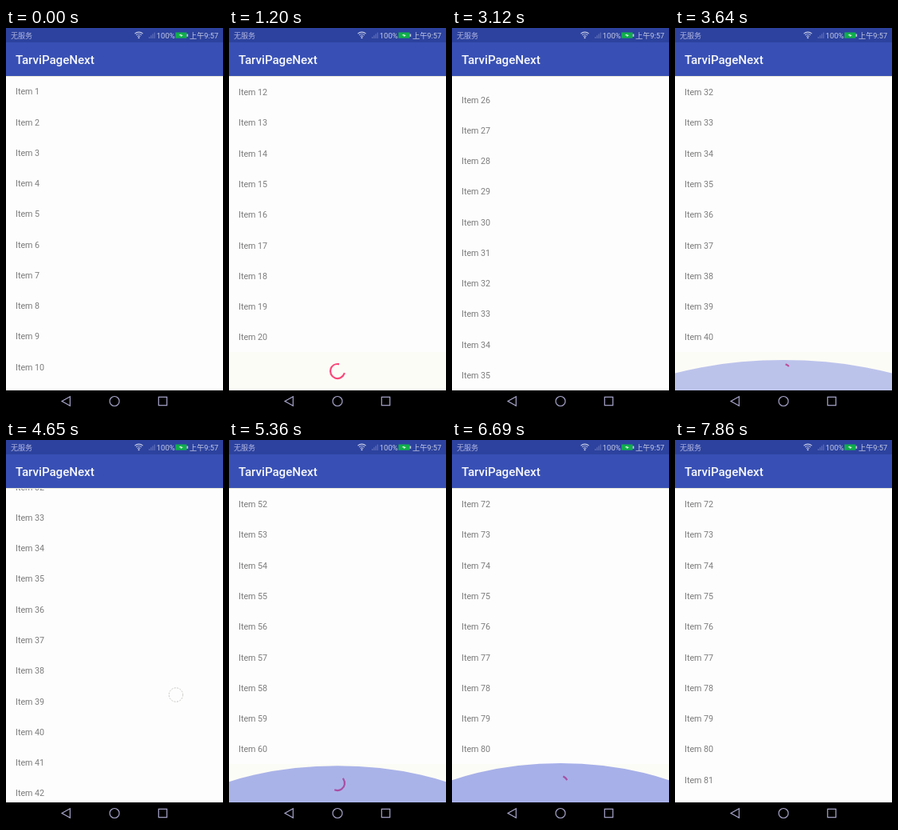
Animation of 272 by 480 pixels, one loop 8000 ms. Source, as an HTML page with a canvas:

```html
<!DOCTYPE html>
<html lang="zh">
<head>
<meta charset="utf-8">
<title>Endless list</title>
<style>
  html, body { margin: 0; width: 100%; height: 100%; overflow: hidden; background: #000; }
  canvas { display: block; width: 100vw; height: 100vh; }
</style>
</head>
<body>
<canvas id="stage"></canvas>
<script>
const W = 272, H = 480, LOOP = 8000;
const TOP = 60, BOTTOM = 453, ROW = 38.27, LOADER = 47.7, PAGE = 20;
const SANS = 'Roboto, "Noto Sans CJK SC", "Noto Sans CJK", sans-serif';

// Each swipe runs to the end of the list; its page has loaded at `done`.
const swipes = [
  { start: 30, hit: 740, done: 2340, glow: 0, alpha: 0 },
  { start: 2470, hit: 3560, done: 4620, glow: 38, alpha: 0.35 },
  { start: 4640, hit: 5140, done: 6180, glow: 46, alpha: 0.45 },
  { start: 6190, hit: 6588, done: 7850, glow: 49, alpha: 0.47 }
];

const canvas = document.getElementById('stage');
const ctx = canvas.getContext('2d');

const clamp = x => Math.max(0, Math.min(1, x));
const endOfList = count => count ? count * ROW + LOADER - (BOTTOM - TOP) : 0;

// cubic-bezier(.4, 0, .2, 1)
function ease(x) {
  if (x <= 0) return 0;
  if (x >= 1) return 1;
  let lo = 0, hi = 1, s = 0.5;
  for (let i = 0; i < 18; i++) {
    s = (lo + hi) / 2;
    const r = 1 - s;
    if (1.2 * r * r * s + 0.6 * r * s * s + s * s * s < x) lo = s; else hi = s;
  }
  return s * s * (3 - 2 * s);
}

function rect(x, y, w, h, color) {
  ctx.fillStyle = color;
  ctx.fillRect(x, y, w, h);
}

function label(str, x, y, font, color) {
  ctx.font = font + ' ' + SANS;
  ctx.fillStyle = color;
  ctx.fillText(str, x, y);
}

function path(points) {
  ctx.beginPath();
  points.forEach(([x, y]) => ctx.lineTo(x, y));
  ctx.closePath();
}

function ring(x, y, r, from = 0, to = Math.PI * 2) {
  ctx.beginPath();
  ctx.arc(x, y, r, from, to);
  ctx.stroke();
}

function stateAt(t) {
  let page = 0;
  while (page < swipes.length - 1 && t >= swipes[page + 1].start) page++;
  const swipe = swipes[page];
  const from = endOfList(page * PAGE), to = endOfList((page + 1) * PAGE);
  const p = clamp((t - swipe.start) / (swipe.hit - swipe.start));
  const moved = (to - from) * (1 - Math.pow(1 - p, 1.28));
  const count = PAGE * (1 + swipes.filter(s => t >= s.done).length);
  return { swipe, moved, scroll: from + moved, count };
}

function drawSpinner(y, age) {
  if (age <= 0) return;
  const cycle = age % 1333 / 1333;
  const turn = age / 4444 * 720 + cycle * 90;
  const tail = turn + 270 * ease(cycle * 2 - 1);
  const head = turn + 270 * ease(cycle * 2);
  const rad = deg => (deg - 90) * Math.PI / 180;
  ctx.strokeStyle = '#fb4678';
  ctx.lineWidth = 2.2;
  ctx.lineCap = 'square';
  ring(136, y, 9, rad(tail), rad(Math.max(head, tail + 4)));
  ctx.lineCap = 'butt';
}

function drawGlow(swipe, t) {
  const age = t - swipe.hit;
  if (!swipe.glow || age <= 0) return;
  const fade = 1 - clamp((age - 220) / 500);
  const level = Math.min(1, age / 80) * fade * fade;
  if (level <= 0) return;
  const h = swipe.glow * level;
  ctx.fillStyle = `rgba(70,90,215,${swipe.alpha * Math.sqrt(level)})`;
  ctx.beginPath();
  ctx.ellipse(W / 2, BOTTOM + 2.25 * h, W, 3.25 * h, 0, 0, Math.PI * 2);
  ctx.fill();
}

function drawTouch(swipe, moved, t) {
  const age = t - swipe.start;
  if (age < 0 || age > 135) return;
  ctx.strokeStyle = '#c6c6c0';
  ctx.lineWidth = 1;
  ctx.setLineDash([2, 1.5]);
  ring(213, 340 - moved, 8.7);
  ctx.setLineDash([]);
}

function drawList(t) {
  const { swipe, moved, scroll, count } = stateAt(t);
  ctx.save();
  ctx.beginPath();
  ctx.rect(0, TOP, W, BOTTOM - TOP);
  ctx.clip();
  rect(0, TOP, W, BOTTOM - TOP, '#fdfdfe');
  const first = Math.max(0, Math.floor(scroll / ROW) - 1);
  for (let i = first; i < Math.min(count, first + 14); i++) {
    label('Item ' + (i + 1), 12, TOP + i * ROW - scroll + 23.3, '10.7px', '#7c7c7c');
  }
  const loaderY = TOP + count * ROW - scroll;
  if (loaderY < BOTTOM) {
    rect(0, loaderY, W, LOADER, '#fcfcf6');
    drawSpinner(loaderY + 23.7, t - swipe.hit + 20);
  }
  drawGlow(swipe, t);
  drawTouch(swipe, moved, t);
  ctx.restore();
}

function drawStatusBar() {
  const pale = '#c6cbe6';
  rect(0, 0, W, 18, '#2c429e');
  label('无服务', 6, 12.7, '9px', '#b0b4e0');

  ctx.strokeStyle = pale;
  ctx.lineWidth = 1.1;
  for (const r of [2.6, 5, 7.4]) ring(166.5, 12.5, r, -Math.PI * 0.74, -Math.PI * 0.26);
  ctx.fillStyle = pale;
  ctx.beginPath();
  ctx.arc(166.5, 12.2, 1, 0, 7);
  ctx.fill();

  for (let i = 0; i < 4; i++) rect(179 + i * 2.2, 11 - i * 1.8, 1.3, 2 + i * 1.8, '#5c6cb8');
  label('100%', 188.7, 12.7, '9.5px', pale);

  rect(212.5, 5.5, 14, 7.2, '#10ae4c');
  rect(226.5, 7.5, 1.7, 3.3, pale);
  path([[216.5, 9], [219.5, 7.4], [219.3, 8.6], [222, 9], [219, 11], [219.2, 9.6]]);
  ctx.fillStyle = '#e6fbe9';
  ctx.fill();
  label('上午9:57', 230, 12.7, '9.2px', pale);
}

function drawToolbar() {
  rect(0, 18, W, 42, '#3850b5');
  rect(0, 60, W, 1, '#e9e7da');
  label('TarviPageNext', 12, 45, '500 15.1px', '#f8f8fb');
}

function drawNavBar() {
  rect(0, BOTTOM, W, H - BOTTOM, '#000');
  ctx.strokeStyle = '#a9a6cc';
  ctx.lineWidth = 1.2;
  path([[70, 466.5], [80.3, 460.7], [80.3, 472.3]]);
  ctx.stroke();
  ring(136, 466.5, 6);
  ctx.strokeRect(191.3, 461.3, 10.4, 10.4);
}

function frame(now) {
  const k = window.devicePixelRatio || 1;
  const w = Math.round(innerWidth * k), h = Math.round(innerHeight * k);
  if (canvas.width !== w || canvas.height !== h) {
    canvas.width = w;
    canvas.height = h;
  }
  ctx.setTransform(w / W, 0, 0, h / H, 0, 0);
  drawList(now % LOOP);
  drawToolbar();
  drawStatusBar();
  drawNavBar();
  requestAnimationFrame(frame);
}
requestAnimationFrame(frame);
</script>
</body>
</html>
```
